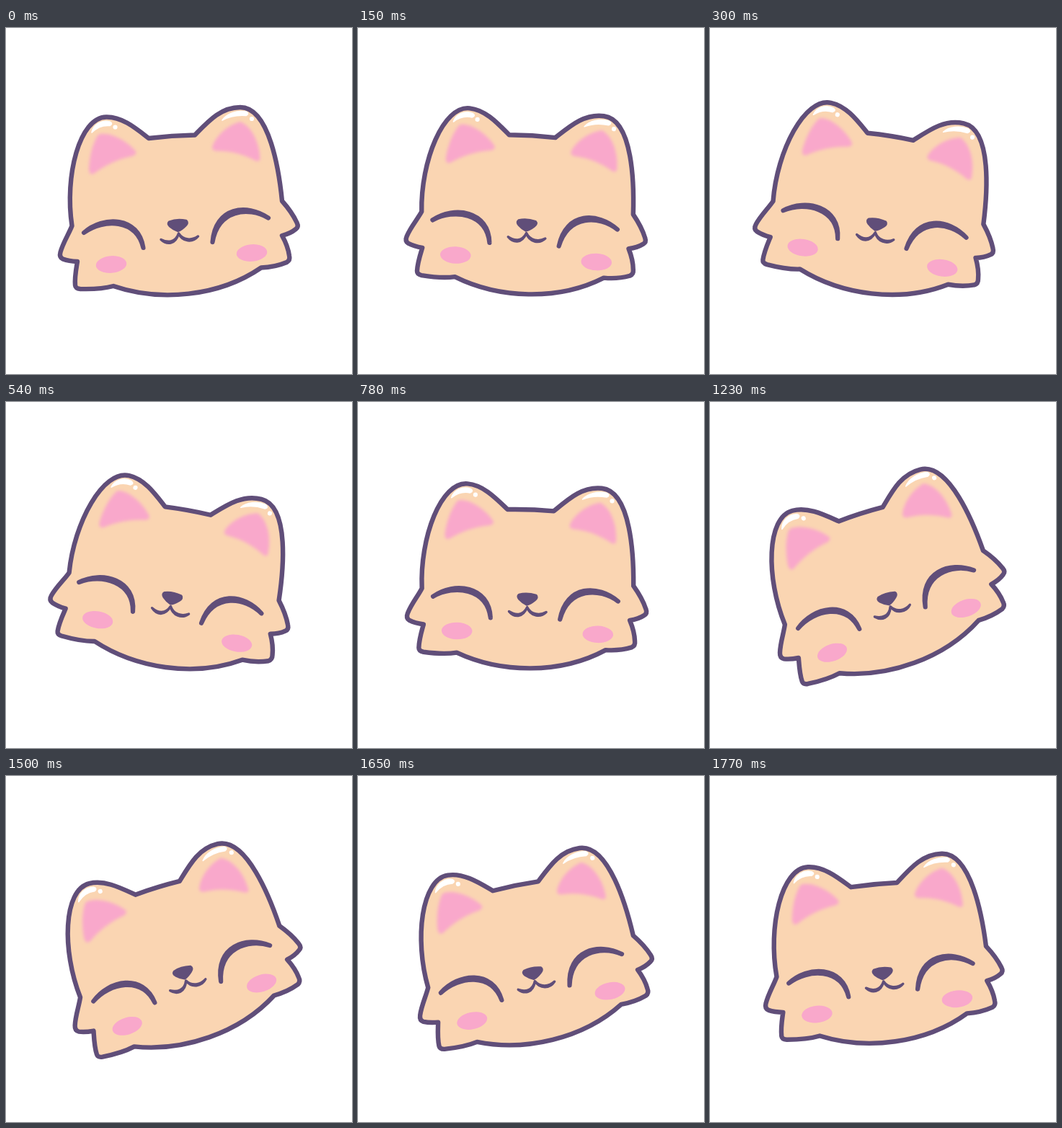
Animation, 480 px wide and 480 px high, one loop 1.8 s. Source, as an HTML page:

```html
<!DOCTYPE html>
<html lang="en">
<head>
<meta charset="utf-8">
<title>Swaying cat</title>
<style>
  @property --turn {
    syntax: '<number>';
    inherits: false;
    initial-value: 0;
  }
  html, body {
    margin: 0;
    width: 100%;
    height: 100%;
    overflow: hidden;
    background: #fff;
  }
  svg {
    display: block;
    width: 100vw;
    height: 100vh;
  }
  /* Sine sway of 15 degrees, drawn in 30 ms steps */
  .head {
    transform-origin: 240px 240px;
    transform: rotate(calc(15deg * sin(var(--turn) * 360deg)));
    animation: sway 1.8s steps(60) infinite;
  }
  @keyframes sway {
    from { --turn: 0; }
    to { --turn: 1; }
  }
  .face { fill: #fad5b2; stroke: #604e79; stroke-width: 6.4; stroke-linejoin: round; }
  .pink { fill: #f9a8cb; }
  .ink { fill: #604e79; stroke: #604e79; stroke-linecap: round; stroke-linejoin: round; }
  .eye { stroke-width: 6.2; }
  .mouth { stroke-width: 3.4; }
  .shine { fill: #fff; stroke: #fff; stroke-width: 1.6; stroke-linejoin: round; }
</style>
</head>
<body>
<svg viewBox="0 0 480 480">
  <defs>
    <filter id="soft" x="-20%" y="-20%" width="140%" height="140%">
      <feGaussianBlur stdDeviation="2.2"/>
    </filter>
  </defs>
  <g class="head">
    <path class="face" d="M198 153 C180 139 161 123 139 123.5 C102 124 81 205 91.5 274.5
      C87 286 79 298 75.500 311 Q73.500 318 79 320.500 Q87 323.500 99 324
      C97 336 95 346 96 357 Q96.500 361.500 103 362 C120 362.500 136 361.500 149 358
      C213 380 295 373 354 332.500 C368 332 380 329 389.500 325 Q394.500 322 393 316
      C391.500 305 388 297 383 288 C391 286 396 284 402 279 Q406.500 276 403.500 270
      C398 258 391 249 383 240 C379 200 366 110 325 110
      C298 110 281 129 262 148.500 Q230 149 198 153Z"/>

    <g class="pink" filter="url(#soft)">
      <path d="M128 148 C143 142 170 158 180 171 Q182 176 174 178 C155 182 138 190 122 202
        Q115 205 115 195 C116 177 120 160 128 148Z"/>
      <path d="M325 130 C342 137 352 161 352.500 181 Q352 187 345 183.500 C329 175 311 170.500 291 170.500
        Q284 170 287 162 C294 147 309 134 325 130Z"/>
    </g>

    <g class="shine">
      <path d="M119 145 C121 134 133 127 144 130 Q149 132.500 144 135.500 C134 134.500 126 138 119 145Z"/>
      <circle cx="151.500" cy="137.500" r="2.300"/>
      <path d="M300 128 C306 119 320 114 333 116 Q338 119 333 121.500 C321 120.500 311 122 300 128Z"/>
      <circle cx="341" cy="126" r="2.300"/>
    </g>

    <g class="pink">
      <ellipse cx="146" cy="328" rx="21.3" ry="11.8" transform="rotate(-4.6 146 328)"/>
      <ellipse cx="341" cy="312" rx="21.3" ry="11.8" transform="rotate(-4.6 341 312)"/>
    </g>

    <g class="ink eye">
      <path d="M108 284 C135 260 184 261 190.500 305 C181 265 136 264 108 284Z"/>
      <path d="M286.500 297 C290 248 334 243 364 263.500 C336 247 294 252 286.500 297Z"/>
    </g>

    <g class="ink mouth">
      <path d="M226.500 269 Q237 265 250 267.500 Q253 270 249 274 Q243 280 238.500 281.500 Q232 279 227.500 275 Q224 271.500 226.500 269Z"/>
      <path d="M215 293.500 C223 301 235 301 239.500 285 C245 297 259 298 266.500 289
        C258 295 246 295 239.500 285 C235 298 224 298 215 293.500Z"/>
    </g>
  </g>
</svg>
</body>
</html>
```
